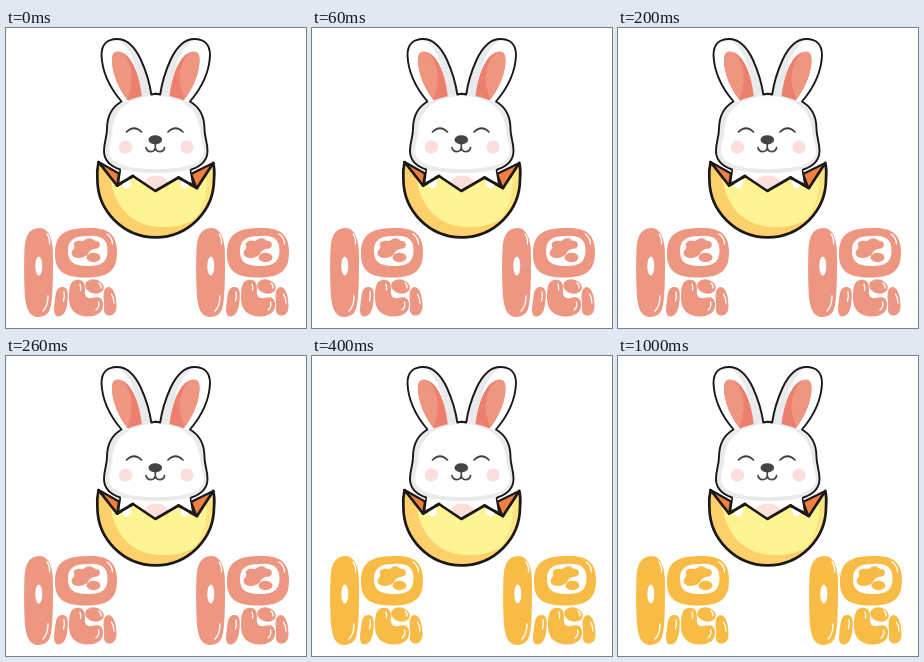
Write an HTML page that moves like this. It is 300 px wide and 300 px high and loops after 1.4 s.

```html
<!DOCTYPE html>
<html lang="zh">
<head>
<meta charset="utf-8">
<title>Bunny in an egg</title>
<style>
  html, body { margin: 0; width: 100%; height: 100%; overflow: hidden; background: #fff; }
  svg { display: block; width: 100%; height: 100%; }

  .head { --dy: 2px; }
  .face { --dy: 4px; }
  .words { --dy: -6px; }
  .head, .face, .words g { animation: bob 1.4s step-end infinite; }
  .words { animation: tint 1.4s step-end infinite; }
  .second { animation: nudge 1.4s step-end infinite; }

  /* four 100 ms beats, then a 1 s rest */
  @keyframes bob {
    0%, 14.2857%, 28.5714% { transform: translateY(0); }
    7.14286%, 21.42857% { transform: translateY(var(--dy)); }
  }
  @keyframes tint {
    0% { color: #ed9681; }
    28.5714%, 100% { color: #f8bb46; }
  }
  @keyframes nudge {
    0% { transform: translateX(172px); }
    28.5714%, 100% { transform: translateX(173px); }
  }
</style>
</head>
<body>
<svg viewBox="0 0 300 300" fill="none" stroke-linecap="round" stroke-linejoin="round">
  <defs>
    <path id="outline" d="M150 65.700 Q147.500 65.700 145.300 66.500 C143.500 54 140 43 135 32 C129 19 121 11 111 11
      C101 11 95.500 17 95.500 27 C96 43 104 60 115.500 73.500 C106 79 101 89 101 101
      C101 109 98 114 98 123 C98 132 104 138 114 141.500"/>
    <g id="ear">
      <use href="#outline" fill="#e9eaec"/>
      <path d="M116 74 C104 60 96.500 43 96.500 27 C96.500 17 102 12 111 12 C124 17 134 42 135 72 Z" fill="#fff"/>
      <path d="M123 74 C113 62 106 45 106 32 C106 25 109 23 114 24 C126 26 134 48 136 70 Z" fill="#ec7f6e"/>
      <path d="M121.500 71.500 C112 60 106 45 106 32 C106 25 109 23 114 24 C123 28 129 47 124 62 Z" fill="#ee9680"/>
    </g>
    <path id="shell" d="M92.500 134 L111 157.500 L127 148 L149.300 163 L172.500 149.500 L191 160 L207.300 135
      C208.500 140 208.500 146 208 151 A58.300 58.300 0 0 1 91.400 151 C91 146 91.300 140 92.500 134 Z"/>
    <clipPath id="shellClip"><use href="#shell"/></clipPath>

    <g id="glyph">
      <g fill="currentColor">
        <path d="M33 200 C43 199.500 47.500 212 47 230 C47 250 47 272 44 281 C42 287 37 289 31 289
          C22 288 19 278 18.500 260 C18 245 18 234 18.500 222 C19 208 23 200.500 33 200 Z"/>
        <path d="M80 200 C101 199 111 205 111 224 C111 243 102 249.500 80 249.500 C58 249.500 49 243 49 226 C49 207 58 200.500 80 200 Z"/>
        <path d="M55.500 259 C61.500 258 62.500 264 61.500 272 C61 282 58 288.500 52 288.500 C46.500 288 48 279 49 272 C50 265 50 260 55.500 259 Z"/>
        <path d="M70 252 C77 251 79 255 79 261 C78 268 81 271 86 270 C90 269 96 268 97 275
          C98 284 91 288.500 82 288.500 C70 288.500 63 282 63 270 C63 260 64 253 70 252 Z"/>
        <ellipse cx="88.500" cy="258.500" rx="9.500" ry="7" transform="rotate(15 88.500 258.500)"/>
        <path d="M102.500 259 C108 259 110.500 269 110.500 278 C110.500 285 107 288 102 287.500 C96.500 286 98.500 280 98 274 C97 266 97.500 260 102.500 259 Z"/>
      </g>
      <g fill="#fff">
        <ellipse cx="32.800" cy="238" rx="3.500" ry="9.500"/>
        <path d="M82 208 C96 207 101.500 212 101.500 222 C101.500 234 96 238 82 238 C67 238 62 233 62 223 C62 212 68 208 82 208 Z"/>
      </g>
      <g fill="currentColor">
        <path d="M82 210.500 C87 209.500 87 213 90 213 C95 213 95 219.500 91 220.500 C86 221 84 222 82 226
          C78 231 68 231 66 227 C64 222 70 221 68 218 C66 213 73 212 76 213 C79 213 79 211 82 210.500 Z"/>
        <ellipse cx="87.500" cy="229.500" rx="7" ry="4.700"/>
      </g>
      <g stroke="#fff" stroke-width="1.300">
        <path d="M41 206 Q44 210 43.500 216 M42 268 Q42 278 37 283 M101 206 Q106 209 106.500 216
          M93 255 Q95.500 257 95 260 M92.500 274 Q94 279 90 282 M105.500 266 Q108 270 108 275 M74 256 Q75 259 74.500 262 M58 264 Q59 268 57.500 273"/>
      </g>
    </g>
  </defs>

  <path d="M92.500 134 L113 145.500 L111 159 Z M207.300 135 L185 146 L191 162 Z" fill="#f08040" stroke="#1b1918" stroke-width="2.300"/>
  <path d="M114 140 C115 147 111 151 112.500 166 H187 C188 151 184 147 184.500 140 Z" fill="#fff" stroke="#1b1918" stroke-width="1.600"/>
  <ellipse cx="150" cy="158" rx="13" ry="10.500" fill="#fcdedb"/>

  <g class="head">
    <use href="#ear"/>
    <use href="#ear" transform="matrix(-1 0 0 1 299.500 0)"/>
    <path d="M150 67 C122 67 102 80 102 102 C102 111 98.500 115 98.500 123 C98.500 138 116 145 150 145
      C184 145 202 138 202 123 C202 115 198 111 198 102 C198 80 178 67 150 67 Z" fill="#e9eaec"/>
    <path d="M150 68 C126 68 107 80 106.500 103 C106 111 103 116 103 123 C103 135 120 141 150 141
      C181 141 198 135 198 123 C198 116 195 111 194 103 C193 80 174 68 150 68 Z" fill="#fff"/>
    <g stroke="#1b1918" stroke-width="1.900">
      <use href="#outline"/>
      <use href="#outline" transform="matrix(-1 0 0 1 299.500 0)"/>
    </g>
    <g class="face">
      <g fill="#fcdedb">
        <circle cx="119.500" cy="119" r="6.600"/>
        <circle cx="181" cy="119" r="6.600"/>
      </g>
      <ellipse cx="149.300" cy="111.800" rx="6.800" ry="4.500" fill="#454344"/>
      <g stroke="#454243" stroke-width="1.700">
        <path d="M120.500 104 Q128 96.500 135.500 104 M162 104 Q169.500 96.500 177 104"/>
        <path d="M149.300 115 V119.500 M140 119.500 C141 125 148.500 125 149.300 119.500 C150 125 157.500 125 158.600 119.500"/>
      </g>
    </g>
  </g>

  <use href="#shell" fill="#fdd06c"/>
  <g clip-path="url(#shellClip)">
    <path d="M103 130 H214 C214 168 200 199 157 199 C121 199 102 172 103 130 Z" fill="#fff493"/>
    <path d="M199 140 H214 V187 L181 199 C197 184 204 165 199 140 Z" fill="#fee480"/>
  </g>
  <use href="#shell" stroke="#1b1918" stroke-width="2.700"/>
  <g fill="#fff">
    <ellipse cx="120.500" cy="154.500" rx="4.500" ry="6"/>
    <ellipse cx="178.500" cy="154.500" rx="4.500" ry="6"/>
  </g>
  <path d="M111 157.500 L127 148 M172.500 149.500 L191 160" stroke="#1b1918" stroke-width="2.700"/>

  <g class="words">
    <g>
      <use href="#glyph"/>
      <use class="second" href="#glyph"/>
    </g>
  </g>
</svg>
</body>
</html>
```
